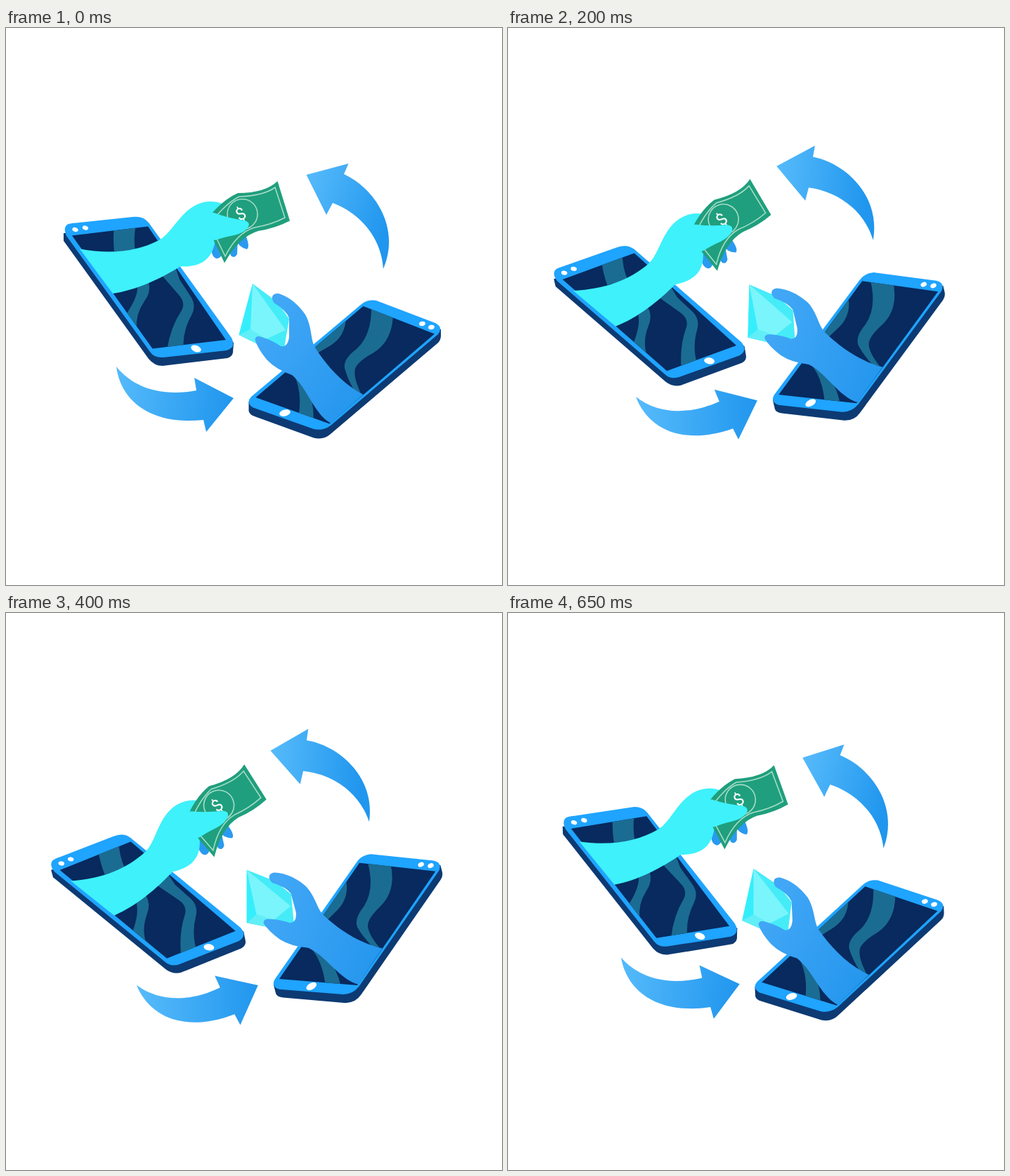
Write an HTML page that moves like this. It is 706x793 px and loops after 0.7 s.

```html
<!DOCTYPE html>
<html lang="en">
<head>
<meta charset="utf-8">
<title>Mobile exchange</title>
<style>
html, body { margin: 0; width: 100%; height: 100%; overflow: hidden; background: #fff; }
svg { display: block; width: 100%; height: 100%; }
.side { fill: #0d3a73; }
.face { fill: #1fa4ff; }
.screen { fill: #082a5e; }
.streak { fill: #1b6c92; }
.light { fill: #fff; }
.line { fill: none; stroke: #a5dcc8; stroke-width: 1.6; }
</style>
</head>
<body>
<svg viewBox="0 0 706 793">
  <defs>
    <linearGradient id="blueTop" gradientUnits="userSpaceOnUse" x1="428" y1="225" x2="548" y2="265">
      <stop offset="0" stop-color="#54b9fa"/><stop offset="1" stop-color="#2096ee"/>
    </linearGradient>
    <linearGradient id="blueBottom" gradientUnits="userSpaceOnUse" x1="160" y1="510" x2="322" y2="545">
      <stop offset="0" stop-color="#54b9fa"/><stop offset="1" stop-color="#2096ee"/>
    </linearGradient>
    <linearGradient id="blueArm" gradientUnits="userSpaceOnUse" x1="358" y1="430" x2="500" y2="530">
      <stop offset="0" stop-color="#42a7f6"/><stop offset="1" stop-color="#2597ee"/>
    </linearGradient>
    <clipPath id="leftScreen"><path d="M94 295.500L202 282.500L313 444L208.500 456.500Z"/></clipPath>
    <clipPath id="rightScreen"><path d="M508.500 396L610 435.500L460.500 563.500L355.500 526Z"/></clipPath>
  </defs>

  <g id="scene">
    <path fill="url(#blueTop)" d="M427.500 209L487.500 193L481 208C525 228 562 285 537 343C534 295 500 262 465 249L456 266Z"/>
    <path fill="url(#blueBottom)" d="M157 482C163 530 205 566 281 558L285 575L324 527L268 498L271 516C230 524 185 517 157 482Z"/>

    <g id="leftPhone">
      <path class="side" d="M82 292V303L203 471Q211 481 223 481L315 470Q322 468 323 462L324 448L200 290Z"/>
      <path class="face" d="M86 296Q81 285 87 280Q90 278 100 277.500L180 269Q195 267 203 277L321 441Q328 455 314 459L224 469Q211 470 205 461Z"/>
      <path class="screen" d="M94 295.500L202 282.500L313 444L208.500 456.500Z"/>
      <g class="streak" clip-path="url(#leftScreen)">
        <path d="M154 280H185Q181 298 184 318H154Q152 300 154 280Z"/>
        <path d="M220 350L246 380Q256 391 250 402Q233 428 229 460H253Q250 434 264 409Q271 396 264 384L247 358L241 340Z"/>
        <path d="M187 366Q189 382 170 409L186 428Q184 408 197 389Q207 376 203 362Z"/>
      </g>
      <ellipse class="light" cx="270.500" cy="456.500" rx="7.500" ry="4.600" transform="rotate(22 270.500 456.500)"/>
      <ellipse class="light" cx="98.500" cy="287" rx="4.300" ry="3" transform="rotate(22 98.500 287)"/>
      <ellipse class="light" cx="113" cy="284.500" rx="4.300" ry="3" transform="rotate(22 113 284.500)"/>
    </g>

    <g id="bill">
      <path fill="#2a9af0" d="M297 298Q289 319 296 326Q301 331 306 325L310 300ZM316 310L320 324Q325 329 329 322L330 300ZM326 300Q332 313 343 315Q347 312 343 300L338 288Z"/>
      <path fill="#3ef1fb" d="M105 314.500C150 323 187 318 218 302C240 290 252 248 291 247Q302 247 309 251L315 290L298 302C294 328 279 341 248 339.500C220 357 186 373 152 378Z"/>
      <path fill="#1f9f7d" d="M292 265Q310 244 330 235Q369 235 386.500 218L404 274.500Q384 285 359 289Q332 297 311 334.500L296 303Z"/>
      <path class="line" d="M299 268Q316 248 332 240Q366 239 383 227L397 270Q378 280 354 284Q329 291 312 325L300 300"/>
      <circle class="line" cx="336.500" cy="265" r="21.500"/>
      <text x="334" y="273" fill="#fff" font-family="Roboto, sans-serif" font-size="24" text-anchor="middle" transform="rotate(-28 334 264.500)">$</text>
      <path fill="#3ef1fb" d="M285 262L296 263Q317 271 340 274Q348 277 345 283Q341 291 325 295Q313 297 298 302L282 300Z"/>
    </g>

    <g id="rightPhone">
      <path class="side" d="M345.500 532V545Q346 550 354 553L438 583.500Q452 587 462 578L614 449Q619 445 619 438V429L520 400Z"/>
      <path class="face" d="M349 525L505 394Q514 386 527 388L611 420Q623 426 615 436L462 566Q451 574 438 571L352 540.500Q341 534 349 525Z"/>
      <path class="screen" d="M508.500 396L610 435.500L460.500 563.500L355.500 526Z"/>
      <g class="streak" clip-path="url(#rightScreen)">
        <path d="M520 395Q521 437 499 457Q480 471 482 484Q486 499 495 515L505 520Q494 497 497 485Q500 475 522 463Q551 446 551 405Z"/>
        <path d="M484 410Q484 438 462 452L443 463L430 450Z"/>
        <path d="M408 490Q423 517 416 555L437 562Q440 540 430 515Z"/>
      </g>
      <ellipse class="light" cx="397" cy="548" rx="8" ry="4.600" transform="rotate(-14 397 548)"/>
      <ellipse class="light" cx="592.500" cy="421" rx="4.400" ry="3.200" transform="rotate(-12 592.500 421)"/>
      <ellipse class="light" cx="605.500" cy="426" rx="4.400" ry="3.200" transform="rotate(-12 605.500 426)"/>
    </g>

    <g id="gem">
      <path fill="#45ecf8" d="M351 364L331.500 437L360 451L396 456L403 414L386 390Z"/>
      <path fill="#35eefc" d="M351 364L331.500 437L348 429Z"/>
      <path fill="#7af5fb" d="M351 364L348 429L370 443L398 430Z"/>
      <path fill="#62eef7" d="M348 429L331.500 437L360 451L370 443Z"/>
    </g>
    <path fill="url(#blueArm)" d="M379 386Q378 377 388 378Q410 385 426 408C436 426 433 443 440 455C457 482 480 507 508.500 522L462 562.500C438 549 429 512 407 494Q384 486 371 472Q358 456 354.500 444Q355 437 364 440Q380 445 391 453Q401 455 403 440V413Q399 402 381 391Z"/>
  </g>
</svg>
<script>
const scene = document.getElementById('scene');
const LOOP = 700, STEP = 50, PEAK = 300, SWING = 20;

// Linear swing out and back, held for each step
function angleAt(time) {
  const t = Math.floor(time % LOOP / STEP) * STEP;
  return -SWING * (t < PEAK ? t / PEAK : (LOOP - t) / (LOOP - PEAK));
}

let start;
function draw(now) {
  start ??= now;
  scene.setAttribute('transform', `rotate(${angleAt(now - start)} 353 396.5)`);
  requestAnimationFrame(draw);
}
requestAnimationFrame(draw);
</script>
</body>
</html>
```
